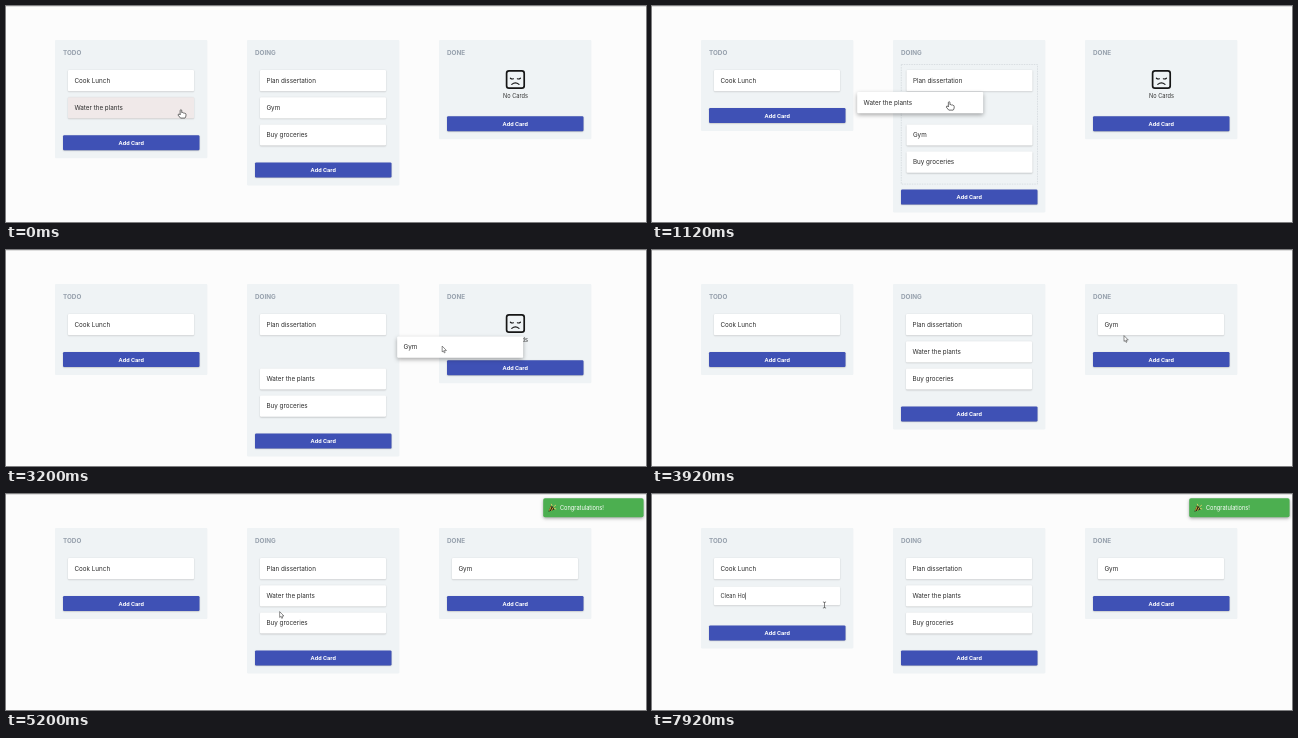
These frames come from a looping animation (640 by 216 pixels, 8 s). An HTML page with a canvas:

```html
<!DOCTYPE html>
<html lang="en">
<head>
<meta charset="utf-8">
<title>Task board</title>
<style>
  html, body { margin: 0; width: 100%; height: 100%; overflow: hidden; background: #fcfcfc; }
  canvas { display: block; width: 640px; height: 216px; }
</style>
</head>
<body>
<canvas id="stage"></canvas>
<script>
const LOOP = 8000;
const canvas = document.getElementById('stage');
const ctx = canvas.getContext('2d');
const dpr = window.devicePixelRatio || 1;
canvas.width = 640 * dpr;
canvas.height = 216 * dpr;

const TODO = 49, DOING = 241, DONE = 433;
const PITCH = 27.2, CARD_W = 126, CARD_H = 21.2;
const UI = 'Inter, sans-serif';

// Moments when the board changes
const LIFT1 = 640, ENTER1 = 960, DROP1 = 1440, LANDED1 = 1600;
const LIFT2 = 2960, ENTER2 = 3280, DROP2 = 3680, LANDED2 = 3840;
const TOAST = 3960, CLICK = 5840, INPUT = 5920;
const KEYS = [6800, 6880, 7040, 7280, 7360, 7520, 7760, 7920];

// Pointer tip: time, x, y
const POINTER = [
  [0, 175, 103.5], [240, 162, 101.5], [400, 154.5, 100.5], [560, 154.5, 100.5],
  [640, 156, 100], [800, 188, 96], [960, 250, 95], [1120, 297, 95.5],
  [1280, 324, 99], [1440, 335, 101.5], [2000, 335, 101.5], [2080, 333, 102],
  [2320, 303, 117], [2560, 299, 126], [2720, 299, 128.5], [2880, 299, 128.5],
  [2960, 306, 127], [3040, 340, 119], [3120, 392, 106], [3200, 436, 96.5],
  [3360, 462, 90], [3680, 472, 86], [4640, 472, 86], [4720, 466, 88],
  [4880, 400, 112], [4960, 372, 114], [5200, 274, 118], [5360, 218, 121],
  [5520, 177, 114], [5680, 172.5, 112], [5840, 172.5, 111]
];

const between = (t, a, b) => t >= a && t < b;
const mix = (a, b, k) => a + (b - a) * k;
const ramp = (t, a, b) => Math.min(1, Math.max(0, (t - a) / (b - a)));
const easeOut = (t, a, b) => 1 - (1 - ramp(t, a, b)) ** 3;
const slot = i => 64 + PITCH * i;

function pointerAt(t) {
  const i = POINTER.findIndex(p => p[0] > t);
  if (i < 0) return { x: POINTER.at(-1)[1], y: POINTER.at(-1)[2] };
  const a = POINTER[i - 1], b = POINTER[i], k = ramp(t, a[0], b[0]);
  return { x: mix(a[1], b[1], k), y: mix(a[2], b[2], k) };
}

function box(x, y, w, h, r, fill) {
  ctx.beginPath();
  ctx.roundRect(x, y, w, h, r);
  ctx.fillStyle = fill;
  ctx.fill();
}

function raised(depth, alpha, paint) {
  ctx.save();
  ctx.shadowColor = `rgba(0,0,0,${alpha})`;
  ctx.shadowOffsetY = depth * dpr;
  ctx.shadowBlur = depth * 2.6 * dpr;
  paint();
  ctx.restore();
}

function text(str, x, y, font, color, align = 'left') {
  ctx.font = font;
  ctx.fillStyle = color;
  ctx.textAlign = align;
  ctx.fillText(str, x, y);
}

function outline(d, x, y, fill, stroke, width) {
  const path = new Path2D(d);
  ctx.save();
  ctx.translate(x, y);
  ctx.lineWidth = width;
  ctx.lineCap = ctx.lineJoin = 'round';
  if (fill) { ctx.fillStyle = fill; ctx.fill(path); }
  if (stroke) { ctx.strokeStyle = stroke; ctx.stroke(path); }
  ctx.restore();
}

function column(x, title, buttonY, zoneActive) {
  box(x, 34, 152.4, buttonY + 23 - 34, 1, '#eff3f5');
  text(title, x + 8, 49.2, `700 6.3px ${UI}`, '#97a1ad');
  raised(0.5, 0.25, () => box(x + 8, buttonY, 136.5, 15, 1.2, '#3f51b5'));
  text('Add Card', x + 76.3, buttonY + 9.7, '700 6.1px Roboto, sans-serif', '#fff', 'center');
  if (!zoneActive) return;
  ctx.save();
  ctx.setLineDash([1.5, 1]);
  ctx.lineWidth = 0.5;
  ctx.strokeStyle = '#c3c9ce';
  ctx.strokeRect(x + 8.3, 58.5, 136.2, buttonY - 64);
  ctx.restore();
}

function card({ label, x, y, lifted, hovered }) {
  raised(lifted ? 1.8 : 0.6, lifted ? 0.34 : 0.22,
    () => box(x, y, CARD_W, CARD_H, 1, hovered ? '#f0e9e9' : '#fff'));
  text(label, x + 6.4, y + 12.8, `400 6.3px ${UI}`, '#2b2b2b');
}

function emptyNotice() {
  ctx.lineWidth = 1.7;
  ctx.strokeStyle = '#161616';
  ctx.beginPath();
  ctx.roundRect(500.6, 64.8, 17.6, 17.4, 2.4);
  ctx.stroke();
  outline('M-5 -1.2q1.4 1.2 3 .6M5 -1.2q-1.4 1.2-3 .6M-3.6 5q3.6-3.2 7.2 0', 509.4, 73.4, null, '#161616', 1.2);
  text('No Cards', 509.5, 92, `400 5.6px ${UI}`, '#333', 'center');
}

function ripple(t, buttonY) {
  const k = ramp(t, CLICK, CLICK + 640);
  if (k <= 0 || k >= 1) return;
  ctx.save();
  ctx.beginPath();
  ctx.rect(TODO + 8, buttonY, 136.5, 15);
  ctx.clip();
  ctx.beginPath();
  ctx.arc(172.5, buttonY + 9, 120 * easeOut(t, CLICK, CLICK + 560), 0, 7);
  ctx.fillStyle = `rgba(255,255,255,${0.28 * (1 - k)})`;
  ctx.fill();
  ctx.restore();
}

function inputCard(t) {
  raised(0.6, 0.22, () => box(62, 92.8, CARD_W, 18.4, 1, '#fff'));
  const typed = 'Clean Ho'.slice(0, KEYS.filter(k => k <= t).length);
  text(typed, 68.4, 104, `400 5.7px ${UI}`, '#333');
  ctx.fillRect(68.6 + ctx.measureText(typed).width, 98.6, 0.6, 7);
}

function toast(t) {
  if (t < TOAST) return;
  ctx.save();
  ctx.translate(106 * (1 - easeOut(t, TOAST, 4240)), 0);
  raised(1.3, 0.35, () => box(537.2, 4.3, 100.4, 19, 1.8, '#4caf50'));
  outline('M0 0L2.6-6.2Q5.6-5 6.2-2.4Z', 542.3, 17.8, '#26251c', null, 0);
  outline('M1 -1L2.4-4.4M3-.9L4.4-3.4', 542.6, 17.2, null, '#e9bd3c', 0.9);
  outline('M0 0l-.6-1.4M2 1l1.6-1.3M2.4 3l1.4.3', 546, 11.6, null, '#f3d36a', 0.8);
  text('Congratulations!', 554, 16, `400 5.65px ${UI}`, '#fff');
  ctx.restore();
}

function cursor(kind, { x, y }) {
  if (kind === 'hand') {
    outline('M-.8 5V.7Q0-.5.8.7V3.2Q1.8 2.6 2.4 3.5Q3.3 3 3.8 3.9Q4.9 3.7 5 4.8V6.4Q4.8 7.7 4 8.6H-.4L-2.9 5.6Q-2.9 4.3-1.8 4.5Z',
      x, y, '#fff', '#333', 0.7);
  } else if (kind === 'beam') {
    outline('M-1.2 -3Q0-3 0-2.4Q0-3 1.2-3M0-2.4V2.4M-1.2 3Q0 3 0 2.4Q0 3 1.2 3', x, y, null, '#333', 0.6);
  } else {
    outline('M0 0V5.4L1.2 4.4L2.1 6.4L3 6L2.2 4H3.9Z', x, y, '#fff', '#444', 0.6);
  }
}

function boardCards(t, tip) {
  const shift = easeOut(t, ENTER1, ENTER1 + 120) ;
  const close = easeOut(t, ENTER2, ENTER2 + 140);
  const swap = easeOut(t, LIFT2 + 60, LIFT2 + 190);

  const water = { label: 'Water the plants', x: TODO + 13, y: slot(1) };
  if (t >= LIFT1) {
    const k = easeOut(t, DROP1, LANDED1);
    water.x = mix(tip.x - 92, DOING + 13, k);
    water.y = mix(tip.y - 9.5, slot(1 + swap - close), k);
    water.lifted = t < LANDED1;
  }

  const gym = { label: 'Gym', x: DOING + 13, y: slot(1 + shift) };
  if (t >= LANDED2) {
    gym.x = DONE + 13;
    gym.y = slot(0);
  } else if (t >= LIFT2) {
    const k = easeOut(t, DROP2, DROP2 + 80);
    gym.x = mix(tip.x - 45, DONE + 13, k);
    gym.y = mix(tip.y - 10, 94, k);
    gym.lifted = true;
  }

  return [
    { label: 'Cook Lunch', x: TODO + 13, y: slot(0) },
    { label: 'Plan dissertation', x: DOING + 13, y: slot(0) },
    { label: 'Buy groceries', x: DOING + 13, y: slot(2 + shift - close) },
    water, gym
  ];
}

function draw(t) {
  const tip = pointerAt(t);
  const dragging = between(t, LIFT1, LANDED1) || between(t, LIFT2, LANDED2);
  const inZone = x => dragging && between(tip.x, x + 8, x + 144.5);
  const buttonFor = count => 74.8 + PITCH * count;

  const todoButton = t >= INPUT ? 131.4 : buttonFor(t < ENTER1 ? 2 : 1);
  const doingButton = buttonFor(between(t, ENTER1, ENTER2) ? 4 : 3);
  const doneButton = t >= LANDED2 ? buttonFor(1) : t >= ENTER2 ? 137.5 : 110.3;

  ctx.setTransform(dpr, 0, 0, dpr, 0, 0);
  ctx.fillStyle = '#fcfcfc';
  ctx.fillRect(0, 0, 640, 216);
  ctx.fillStyle = '#dedede';
  ctx.fillRect(0, 0, 640, 1);

  column(TODO, 'TODO', todoButton, inZone(TODO));
  column(DOING, 'DOING', doingButton, inZone(DOING));
  column(DONE, 'DONE', doneButton, inZone(DONE));
  ripple(t, todoButton);
  if (t < LANDED2) emptyNotice();
  if (t >= INPUT) inputCard(t);

  const cards = boardCards(t, tip);
  for (const c of cards) {
    c.hovered = !dragging && between(tip.x, c.x, c.x + CARD_W) && between(tip.y, c.y, c.y + CARD_H);
    if (!c.lifted && c.x === DOING + 13 && inZone(DOING)) c.x += 0.5;
  }
  cards.sort((a, b) => !!a.lifted - !!b.lifted).forEach(card);
  toast(t);

  const onButton = between(t, 5480, INPUT);
  const hand = onButton || between(t, LIFT1, LANDED1) || cards.some(c => c.hovered);
  cursor(t >= INPUT ? 'beam' : hand ? 'hand' : 'arrow', tip);
}

function frame() {
  draw(performance.now() % LOOP);
  requestAnimationFrame(frame);
}
frame();
</script>
</body>
</html>
```
